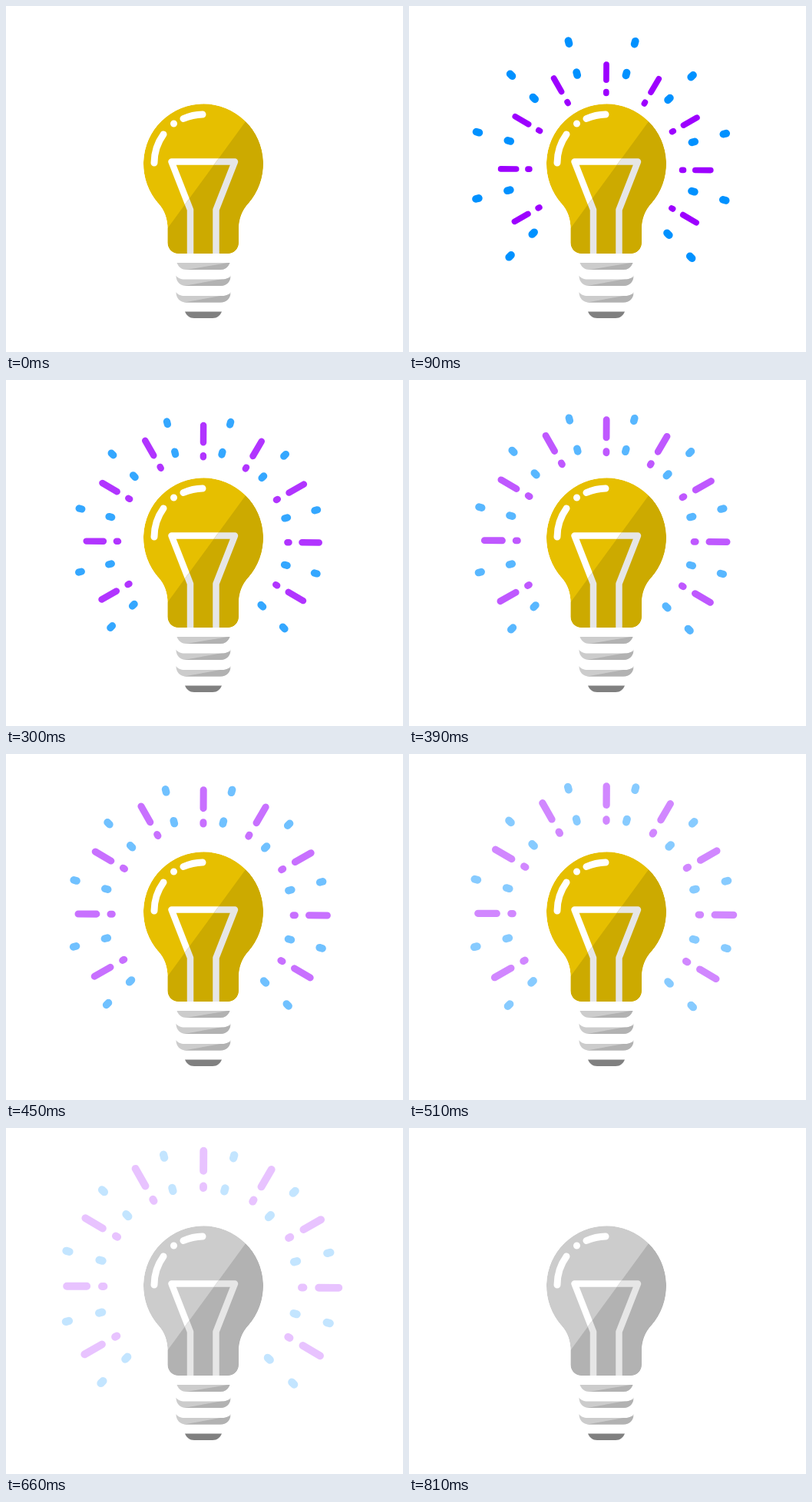
Write an HTML page that moves like this. It is 517 px wide and 450 px high and loops after 1.08 s.

```html
<!DOCTYPE html>
<html lang="en">
<head>
<meta charset="utf-8">
<title>Light bulb</title>
<style>
html, body { margin: 0; width: 100%; height: 100%; overflow: hidden; background: #fff; }
svg { display: block; width: 100vw; height: 100vh; }
.round { fill: none; stroke-linecap: round; stroke-linejoin: round; }
</style>
</head>
<body>
<svg viewBox="0 0 517 450">
  <defs>
    <path id="glass" d="M210.5 308V290C210.5 277 206.5 266 199 257.5A78 78 0 1 1 315 257.5C307.5 266 303 277 303 290V308a14 14 0 0 1-14 14H224.5a14 14 0 0 1-14-14z"/>
    <path id="wire" class="round" stroke-width="8.5" d="M240 326V265L215.5 202.5H298L273.5 265V326"/>
    <path id="thread" d="M221.5 0c2 3.5 6 5 11 5H281.5c5 0 9-1.5 11-5c0 8-5 13.5-13 13.5H234.5c-8 0-13-5.5-13-13.5z"/>
    <path id="cap" d="M222.5 334H291.5C289 340 285 343 279 343H235C229 343 225 340 222.5 334z"/>
    <clipPath id="inGlass"><use href="#glass"/></clipPath>
    <clipPath id="inShade"><path d="M320 139.2L203 299.2V322H345V139z"/></clipPath>
    <clipPath id="inCap"><use href="#cap"/></clipPath>
    <clipPath id="inThread"><use href="#thread"/></clipPath>
  </defs>
  <g id="rays">
    <g id="blue" stroke="#0091ff" stroke-width="10" class="round"></g>
    <g id="purple" stroke="#9d00ff" stroke-width="8" class="round"></g>
  </g>
  <g clip-path="url(#inGlass)">
    <use id="light" href="#glass"/>
    <use href="#wire" stroke="#fff"/>
    <g clip-path="url(#inShade)">
      <use id="dark" href="#glass"/>
      <use href="#wire" stroke="#e6e6e6"/>
    </g>
  </g>
  <g class="round" stroke="#fff" stroke-width="9">
    <path d="M193 204A64 64 0 0 1 205 167M218.5 153h.01M231 146.5A64 64 0 0 1 256 141"/>
  </g>
  <use href="#cap" fill="#ccc"/>
  <path clip-path="url(#inCap)" fill="#b2b2b2" d="M232 343.5L292 333.5V344H232z"/>
  <g id="threads"></g>
  <path fill="#808080" d="M233 397.5H281C278.5 403 275 406 269 406H245C239 406 235.500 403 233 397.5z"/>
</svg>
<script>
const LOOP = 1080, STEP = 30, FADE_START = 165, END = 810, OFF = 660;
const el = id => document.getElementById(id);

// Radial strokes, each span given as [inner, outer] radius
function burst(first, count, spans) {
  let d = "";
  for (let i = 0; i < count; i++) {
    const a = (first + i * 30 + 0.35) * Math.PI / 180;
    const at = r => `${(r * Math.cos(a)).toFixed(2)} ${(r * Math.sin(a)).toFixed(2)}`;
    for (const [r0, r1] of spans) d += `M${at(r0)}L${at(r1)}`;
  }
  return d;
}

el("purple").innerHTML =
  `<path transform="translate(0 -21.2)" d="${burst(-210, 9, [[104, 106], [122, 143]])}"/>`;
el("blue").innerHTML =
  `<path transform="translate(0 -25.4)" d="${burst(-225, 10, [[125.7, 129.7], [169.2, 173.2]])}"/>`;
el("threads").innerHTML = [350.5, 372].map(y => `<g transform="translate(0 ${y})">
  <use href="#thread" fill="#ccc"/>
  <path clip-path="url(#inThread)" fill="#b2b2b2" d="M232 13.5L293 2.500V14H232z"/></g>`).join("");

const purpleScale = t => 1 + (t - 180) * 0.000496;

// Swells, dips back, then spreads steadily
function blueScale(t) {
  if (t <= 210) return 1 + (t - 180) * 0.0003;
  if (t >= 270) return 0.9276 + (t - 300) * 0.0002775;
  return 1.009 - (t - 210) / 60 * 0.0897;
}

function draw(t) {
  const lit = t < OFF;
  el("light").setAttribute("fill", lit ? "#e6bf00" : "#ccc");
  el("dark").setAttribute("fill", lit ? "#ccaa00" : "#b2b2b2");
  const shown = t > 0 && t < END;
  el("rays").setAttribute("visibility", shown ? "visible" : "hidden");
  const alpha = Math.max(0, Math.min(1, (END - t) / (END - FADE_START)));
  el("rays").setAttribute("opacity", alpha);
  el("purple").setAttribute("transform", `translate(256.2 233) scale(${purpleScale(t)})`);
  el("blue").setAttribute("transform", `translate(250.1 233) scale(${blueScale(t)})`);
}

const start = performance.now();
function tick() {
  const t = (performance.now() - start) % LOOP;
  draw(Math.floor(t / STEP) * STEP);
  requestAnimationFrame(tick);
}
tick();
</script>
</body>
</html>
```
